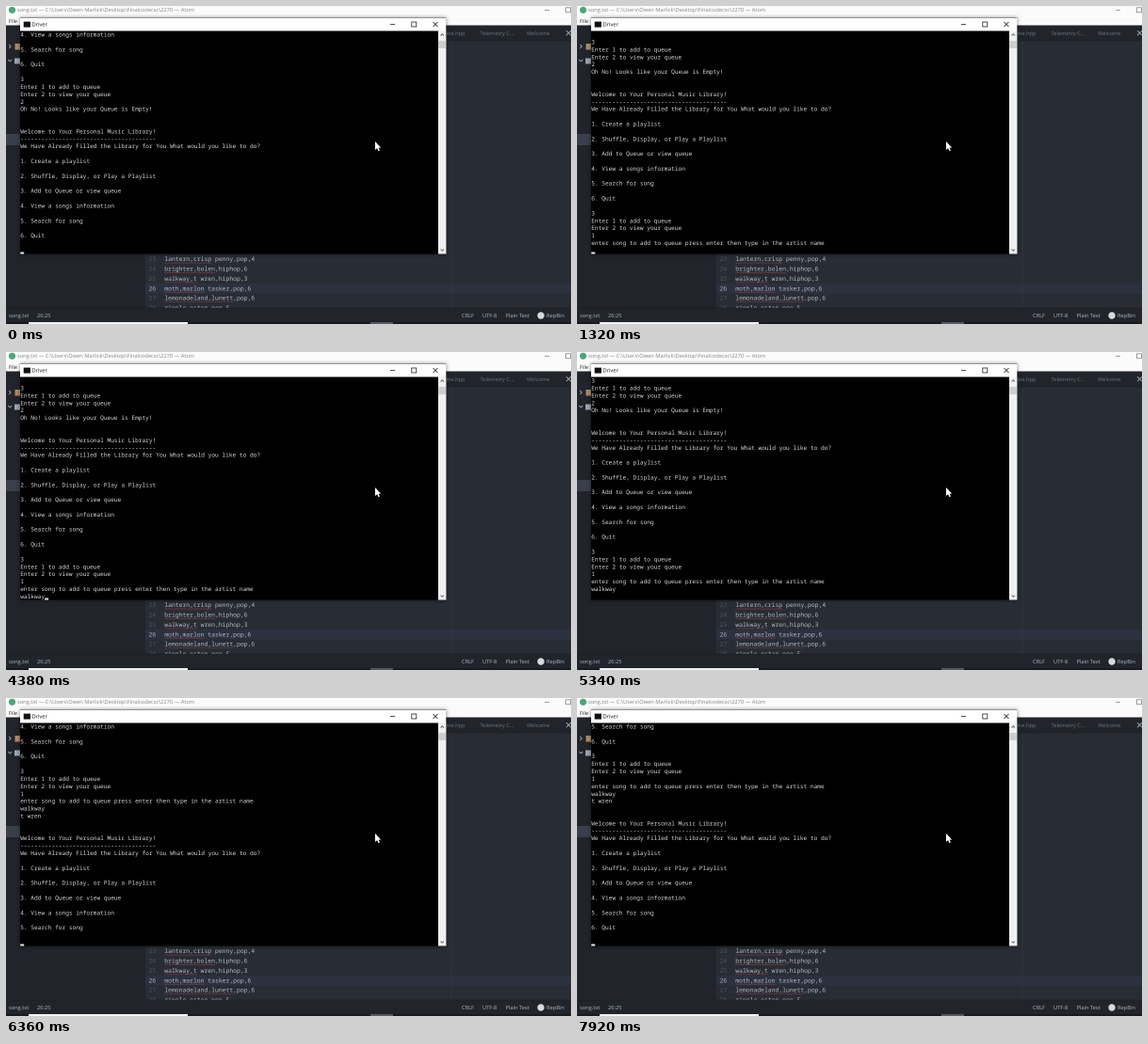
Recreate the animation shown at these times as an HTML page with a canvas. Size 600x338 px, loop 8000 ms.

```html
<!DOCTYPE html>
<html lang="en">
<head>
<meta charset="utf-8">
<title>Music library console</title>
<style>
html, body { margin: 0; width: 100%; height: 100%; overflow: hidden; background: #21252b; }
canvas { display: block; width: 100vw; height: 100vh; }
</style>
</head>
<body>
<canvas id="stage" width="1200" height="676"></canvas>
<script>
const ctx = document.getElementById('stage').getContext('2d');
ctx.scale(2, 2); // finer grid keeps small text off whole-pixel baselines
const UI = '"Open Sans", "Noto Sans", sans-serif';
const MONO = '"Noto Sans Mono", "DejaVu Sans Mono", monospace';
const LOOP = 8000, ROWS = 30, ROW_H = 7.907, CHAR_W = 3.703, LEFT = 15.2;

const RULE = '-'.repeat(39);
const MENU_TOP = `\n\nWelcome to Your Personal Music Library!\n${RULE}\n` +
  'We Have Already Filled the Library for You What would you like to do?\n\n' +
  '1. Create a playlist\n\n2. Shuffle, Display, or Play a Playlist\n\n';
const MENU_MID = '3. Add to Queue or view queue\n\n4. View a songs information\n\n5. Search for song\n\n';
const QUIT = '6. Quit\n\n';
const ASK = 'Enter 1 to add to queue\nEnter 2 to view your queue\n';

const START = '4. View a songs information\n\n5. Search for song\n\n' + QUIT +
  `3\n${ASK}2\nOh No! Looks like your Queue is Empty!\n` + MENU_TOP + MENU_MID + QUIT;

// Output as [time, appended text]
const typed = (word, times) => times.map((t, i) => [t, word[i]]);
const OUTPUT = [
  [540, '3'], [600, '\n'], [660, ASK],
  [1200, '1'], [1260, '\n'], [1320, 'enter song to add to queue press enter then type in the artist name\n'],
  ...typed('walkway', [2700, 2820, 3000, 3180, 3420, 3600, 3720]),
  [4440, '\n'],
  ...typed('t wren', [5580, 5640, 5760, 5880, 5940, 6060]),
  [6240, '\n'], [6300, MENU_TOP], [6360, MENU_MID], [6420, QUIT]
];

// The caret starts visible and flips at each time
const BLINKS = [240, 540, 1140, 1320, 1800, 2160, 2460, 2700, 4080, 4380,
  4740, 4980, 5340, 5580, 6840, 7200, 7500, 7800];

function rect(x, y, w, h, color) {
  ctx.fillStyle = color;
  ctx.fillRect(x, y, w, h);
}

function label(str, x, y, color, size = 5.7, family = UI) {
  ctx.font = `${size}px ${family}`;
  ctx.fillStyle = color;
  ctx.fillText(str, x, y);
}

function dot(x, y, r, color) {
  ctx.fillStyle = color;
  ctx.beginPath();
  ctx.arc(x, y, r, 0, 7);
  ctx.fill();
}

function line(color, width, ...points) {
  ctx.strokeStyle = color;
  ctx.lineWidth = width;
  ctx.beginPath();
  points.forEach(([x, y]) => ctx.lineTo(x, y));
  ctx.stroke();
}

function drawCode() {
  rect(148, 37, 452, 284, '#282c34');
  rect(148, 295, 452, 10.4, '#2c3140');
  line('#363b46', 0.6, [473, 37], [473, 321]);
  const code = ['lantern,crisp penny,pop,4', 'brighter,bolen,hiphop,6', 'walkway,t wren,hiphop,3',
    'moth,marlon tasker,pop,6', 'lemonadeland,lunett,pop,6', 'ripple,osten,pop,5'];
  const marked = [13, 14, 9, 11, 19, 0];
  code.forEach((str, i) => {
    const y = 271.2 + i * 10.35;
    label(23 + i, 151.5, y, i === 3 ? '#abb2bf' : '#4f5666', 6.4, MONO);
    label(str, 168.3, y, '#b4bac6', 6.4, MONO);
    line('#8f3b40', 0.6, [168.3, y + 1.9], [168.3 + marked[i] * 3.84, y + 1.9]);
  });
}

function drawEditor() {
  rect(0, 0, 600, 338, '#21252b');
  drawCode();

  rect(0, 0, 600, 20.5, '#fbfbfb');
  dot(6.5, 4.3, 3.6, '#45a878');
  label('song.txt — C:\\Users\\Owen Marlick\\Desktop\\Finalcodecsc\\2270 — Atom', 12, 6.2, '#858585');
  label('File', 3, 18, '#222');
  line('#777', 0.7, [572, 4.3], [577, 4.3]);
  ctx.strokeRect(594.5, 1.8, 5, 5);

  label('line.hpp', 466, 30.8, '#6d7482');
  label('Telemetry C...', 503.5, 30.8, '#6d7482');
  label('Welcome', 553, 30.8, '#6d7482');
  line('#181a1f', 0.6, [468, 37], [600, 37]);
  line('#aab0bb', 0.9, [595, 26.2], [600, 31.2]);
  line('#aab0bb', 0.9, [595, 31.2], [600, 26.2]);

  rect(0, 136, 15, 12, '#3a3f4b');
  line('#9da5b4', 0.9, [3.2, 41], [5.2, 43], [3.2, 45]);
  line('#9da5b4', 0.9, [2.2, 57], [4.2, 59], [6.2, 57]);
  rect(9.5, 40, 5.5, 6.5, '#b58a62');
  rect(9, 55.5, 6, 6, '#9da5b4');

  rect(0, 321, 600, 15, '#21252b');
  line('#181a1f', 0.6, [0, 321], [600, 321]);
  const status = [['song.txt', 3], ['26:25', 33], ['CRLF', 484], ['UTF-8', 506], ['Plain Text', 530.5], ['RepBin', 574]];
  status.forEach(([str, x]) => label(str, x, 331.2, '#b0b7c4', 5.7));
  dot(568, 329, 3.7, '#d5d9e0');

  rect(0, 336, 600, 2, '#17191d');
  rect(24, 336, 169, 2, '#f2f2f2');
  rect(387, 336, 24, 2, '#55585e');
}

function drawWindow() {
  ctx.save();
  ctx.shadowColor = 'rgba(0,0,0,.5)';
  ctx.shadowBlur = 8;
  ctx.shadowOffsetY = 1;
  rect(15, 12, 452.3, 251.5, '#fff');
  ctx.restore();
  line('#555', 0.7, [15, 12.3], [467.3, 12.3]);

  rect(18.7, 16.6, 7.2, 6, '#111');
  label('Driver', 27.5, 21.7, '#111');
  line('#222', 0.8, [408, 19.5], [413, 19.5]);
  ctx.strokeRect(430.8, 17, 5, 5);
  line('#222', 0.8, [453.5, 17], [458.5, 22]);
  line('#222', 0.8, [453.5, 22], [458.5, 17]);

  rect(15, 26.5, 444, 237, '#000');
  rect(459, 26.5, 8.3, 237, '#f0f0f0');
  rect(459.3, 37, 8, 8, '#cdcdcd');
  line('#606060', 0.9, [461.6, 31.5], [463.3, 29.8], [465, 31.5]);
  line('#606060', 0.9, [461.6, 258.6], [463.3, 260.3], [465, 258.6]);
}

function drawConsole(t) {
  const text = OUTPUT.filter(([at]) => at <= t).reduce((s, [, str]) => s + str, START);
  const rows = text.split('\n').slice(-ROWS);
  rows.forEach((row, i) => label(row, LEFT, 32.6 + i * ROW_H, '#dadada', 6.17, MONO));
  if (BLINKS.filter(at => at <= t).length % 2 === 0) {
    rect(LEFT + rows[rows.length - 1].length * CHAR_W, 261.5, 4, 2, '#e4e4e4');
  }
}

function drawPointer() {
  ctx.fillStyle = '#fff';
  ctx.fill(new Path2D('M392 144V153L394.1 151.1 395.5 154.2 396.9 153.5 395.6 150.6H398.2Z'));
}

function draw() {
  const t = performance.now() % LOOP;
  ctx.textRendering = 'geometricPrecision';
  drawEditor();
  drawWindow();
  drawConsole(t);
  drawPointer();
  requestAnimationFrame(draw);
}
draw();
</script>
</body>
</html>
```
